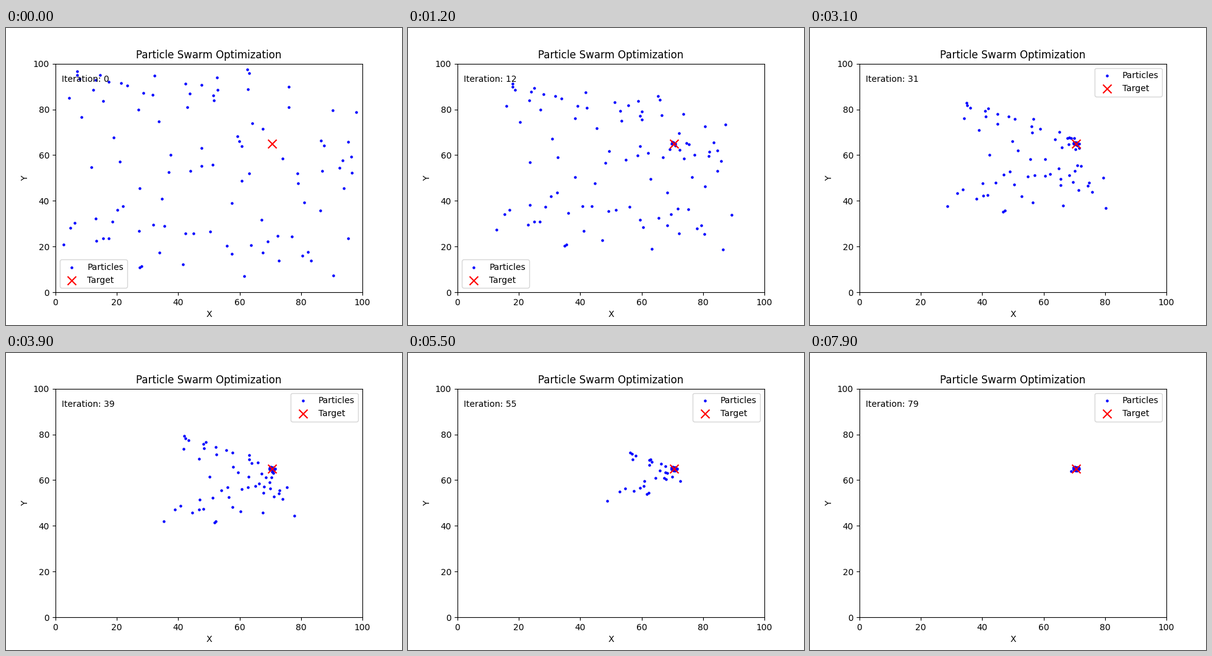
Recreate the animation shown at these times as a matplotlib script. Size 640 by 480 pixels, loop 8000 ms.

```python
import numpy as np
import matplotlib.pyplot as plt
from matplotlib.animation import FuncAnimation

STEPS = 80
COUNT = 100
REACH = 62        # scattered particles start within this distance
LEGEND_MOVE = 13  # from here on the upper right corner is free

target = np.array([70.6, 65.0])

# Outermost particles, the last to arrive
FAR = [(2.6, 20.9), (4.8, 28.2), (6.3, 30.4), (13.1, 32.3), (13.3, 22.5),
       (15.5, 23.6), (17.3, 23.6), (18.5, 30.9), (27.4, 10.9), (28.0, 11.4),
       (7.1, 96.6), (7.1, 95.0), (7.9, 93.4), (13.1, 92.9), (14.5, 95.0),
       (12.3, 88.5), (4.4, 85.0), (8.5, 76.6)]


def scatter_points(count, seed=7):
    """Random points in reach of the target, sparing the upper right corner."""
    points = np.random.default_rng(seed).uniform(3, 98.5, (4 * count, 2))
    near = np.linalg.norm(points - target, axis=1) < REACH
    clear = points.sum(axis=1) < 180
    return points[near & clear][:count]


offset = np.vstack([FAR, scatter_points(COUNT - len(FAR))]) - target
dist = np.linalg.norm(offset, axis=1)
heading = offset / dist[:, None]


def swarm(step):
    """Move one unit per step to the target, then hop back and forth over it."""
    rest = dist % 1
    hops = step - np.floor(dist)
    hopping = np.where(hops % 2 == 0, rest, rest - 1)
    radius = np.where(hops <= 0, dist - step, hopping)
    return target + heading * radius[:, None]


fig, ax = plt.subplots(figsize=(6.4, 4.8), dpi=100)
ax.set(xlim=(0, 100), ylim=(0, 100), xlabel="X", ylabel="Y",
       title="Particle Swarm Optimization")
dots = ax.scatter(*swarm(0).T, s=5, c="blue", label="Particles")
ax.scatter(*target, s=100, c="red", marker="x", label="Target")
counter = ax.text(0.02, 0.92, "", transform=ax.transAxes)
legend = ax.legend(loc="lower left")


def update(step):
    dots.set_offsets(swarm(step))
    counter.set_text(f"Iteration: {step}")
    legend.set_loc("lower left" if step < LEGEND_MOVE else "upper right")
    return dots, counter, legend


anim = FuncAnimation(fig, update, frames=STEPS, interval=100, repeat=True,
                     repeat_delay=0)
plt.show()
```
